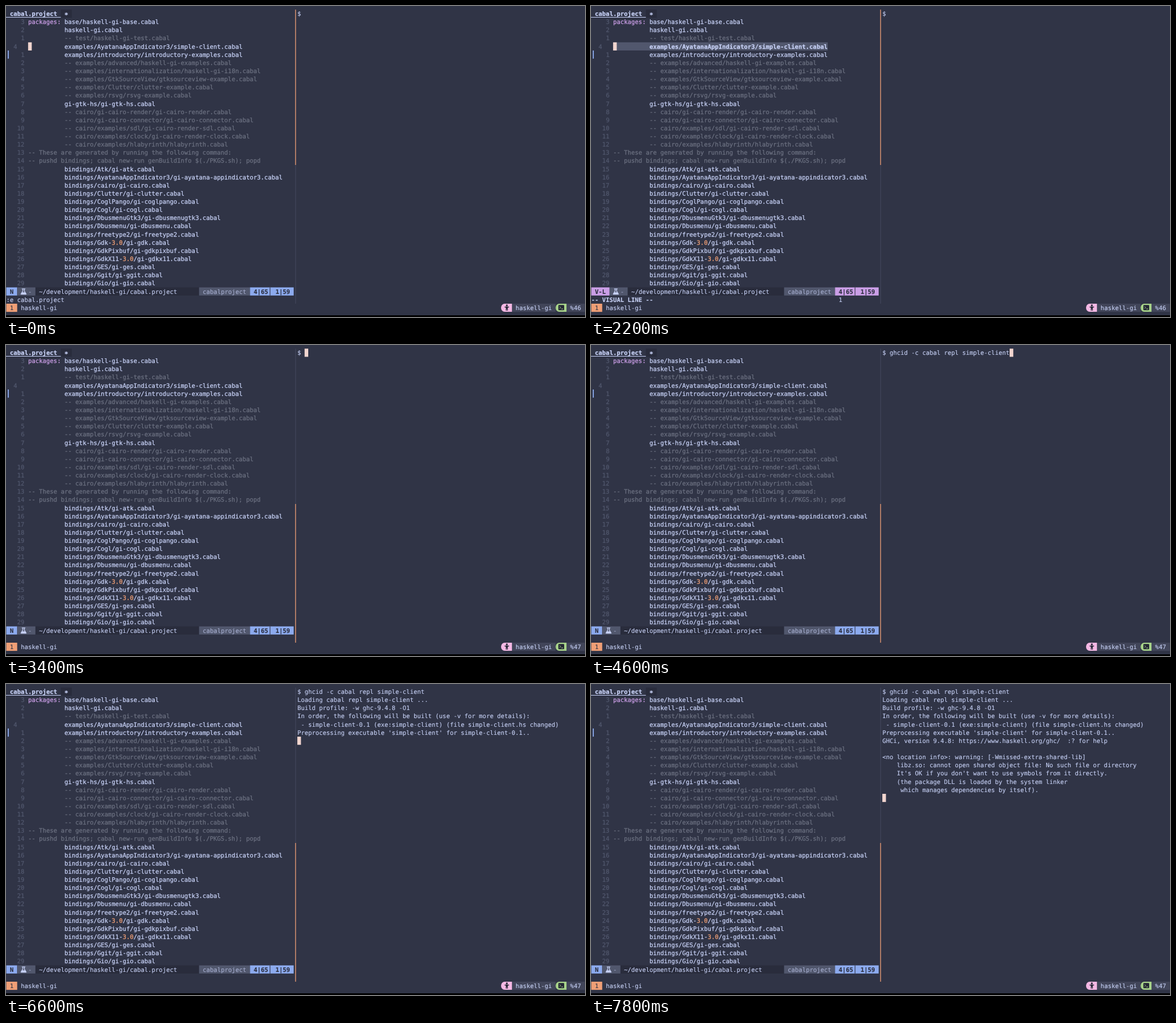
These frames come from a looping animation (1000x538 px, 8000 ms). An HTML page:

```html
<!DOCTYPE html>
<html lang="en">
<head>
<meta charset="utf-8">
<title>Terminal session</title>
<style>
  html, body { margin: 0; width: 100%; height: 100%; overflow: hidden; background: #303446; }
  svg { display: block; width: 100vw; height: 100vh; }
  text {
    font: 10.437px "DejaVu Sans Mono", "Noto Sans Mono", monospace;
    white-space: pre;
    text-rendering: geometricPrecision;
  }
  text, tspan { fill: currentColor; stroke: currentColor; stroke-width: .12; }
  .files text, .files tspan { stroke-width: .28; }
  .bold { font-weight: bold; }
</style>
</head>
<body>
<svg id="stage" viewBox="0 0 1000 538"></svg>
<script>
const LOOP = 8000, CW = 6.283, RH = 14.13, LEFT = .5, TOP = 6.3, RIGHT = 80;
const C = {
  text: '#c6d0f5', sub: '#a5adce', dim: '#6b7080', num: '#51576d', bar: '#51576d',
  mantle: '#292c3c', surface: '#414559', base: '#303446', crust: '#232634', black: '#000',
  blue: '#8caaee', mauve: '#ca9ee6', peach: '#ef9f76',
  cursor: '#f2d5cf', pink: '#f4b8e4', green: '#a6d189'
};

const FILES = `packages: base/haskell-gi-base.cabal
haskell-gi.cabal
-- test/haskell-gi-test.cabal
examples/AyatanaAppIndicator3/simple-client.cabal
examples/introductory/introductory-examples.cabal
-- examples/advanced/haskell-gi-examples.cabal
-- examples/internationalization/haskell-gi-i18n.cabal
-- examples/GtkSourceView/gtksourceview-example.cabal
-- examples/Clutter/clutter-example.cabal
-- examples/rsvg/rsvg-example.cabal
gi-gtk-hs/gi-gtk-hs.cabal
-- cairo/gi-cairo-render/gi-cairo-render.cabal
-- cairo/gi-cairo-connector/gi-cairo-connector.cabal
-- cairo/examples/sdl/gi-cairo-render-sdl.cabal
-- cairo/examples/clock/gi-cairo-render-clock.cabal
-- cairo/examples/hlabyrinth/hlabyrinth.cabal
-- These are generated by running the following command:
-- pushd bindings; cabal new-run genBuildInfo $(./PKGS.sh); popd
bindings/Atk/gi-atk.cabal
bindings/AyatanaAppIndicator3/gi-ayatana-appindicator3.cabal
bindings/cairo/gi-cairo.cabal
bindings/Clutter/gi-clutter.cabal
bindings/CoglPango/gi-coglpango.cabal
bindings/Cogl/gi-cogl.cabal
bindings/DbusmenuGtk3/gi-dbusmenugtk3.cabal
bindings/Dbusmenu/gi-dbusmenu.cabal
bindings/freetype2/gi-freetype2.cabal
bindings/Gdk-3.0/gi-gdk.cabal
bindings/GdkPixbuf/gi-gdkpixbuf.cabal
bindings/GdkX11-3.0/gi-gdkx11.cabal
bindings/GES/gi-ges.cabal
bindings/Ggit/gi-ggit.cabal
bindings/Gio/gi-gio.cabal`.split('\n');

const OUTPUT = `$ ghcid -c cabal repl simple-client
Loading cabal repl simple-client ...
Build profile: -w ghc-9.4.8 -O1
In order, the following will be built (use -v for more details):
 - simple-client-0.1 (exe:simple-client) (file simple-client.hs changed)
Preprocessing executable 'simple-client' for simple-client-0.1..
GHCi, version 9.4.8: https://www.haskell.org/ghc/  :? for help

<no location info>: warning: [-Wmissed-extra-shared-lib]
    libz.so: cannot open shared object file: No such file or directory
    It's OK if you don't want to use symbols from it directly.
    (the package DLL is loaded by the system linker
     which manages dependencies by itself).`.split('\n');

// [start ms, finished output lines]
const PRINTED = [[6000, 2], [6400, 5], [6600, 6], [6800, 7], [7800, 13]];

const X = col => LEFT + col * CW;
const Y = row => TOP + row * RH;
const escape = s => s.replace(/</g, '&lt;');
const rect = (x, y, w, h, fill) =>
  `<rect x="${x}" y="${y}" width="${w}" height="${h}" fill="${fill}"/>`;
const cells = (col, row, n, fill) => rect(X(col), Y(row), n * CW, RH, fill);
const put = (col, row, s, color = C.text, bold = false) =>
  `<text x="${X(col)}" y="${Y(row) + 10.8}" color="${color}"${bold ? ' class="bold"' : ''}>${s}</text>`;
const span = (s, color) => `<tspan color="${color}">${s}</tspan>`;
const path = (d, fill) => `<path d="${d}" fill="${fill}" fill-rule="evenodd"/>`;

function editor(visual) {
  let out = cells(15, 0, 3, C.mantle) + put(1, 0, 'cabal.project', C.text, true) +
    put(16, .15, '*', C.text, true) + rect(0, 19, X(15), 1, C.text) +
    rect(3, Y(5), 1.8, RH, C.blue);
  FILES.forEach((line, i) => {
    const row = i + 1, here = row === 4;
    const col = /^(packages|-- (These|pushd))/.test(line) ? 6 : 16;
    const num = String(here ? 4 : Math.abs(row - 4));
    out += put(here ? 2 : 5 - num.length, row, num, C.num);
    if (here && visual) out += cells(6, row, 59, C.bar);
    const code = line.replace('packages:', s => span(s, C.mauve)).replace('3.0', s => span(s, C.peach));
    out += put(col, row, code, line.startsWith('--') ? C.dim : C.text, here && visual);
  });
  return `<g class="files">${out}</g>`;
}

function statusLine(visual) {
  const row = 34, accent = visual ? C.mauve : C.blue, mode = visual ? 'V-L' : 'N';
  const c = mode.length + 2, x = X(c) + 6, y = Y(row) + 2;
  return cells(0, row, 79, C.mantle) + cells(0, row, c, accent) + cells(c, row, 5, C.bar) +
    put(1, row, mode, C.mantle, true) +
    path(`M${x + 2} ${y}h6v1.3h-1v3l3 5q.4 1.2-1 1.2h-8q-1.4 0-1-1.2l3-5v-3h-1z` +
      `M${x + 4.3} ${y + 1.3}v3.3l-1.2 2h3.8l-1.2-2v-3.3z`, C.text) +
    put(c + 3, row, '-', C.sub) + put(c + 6, row, '~/development/haskell-gi/cabal.project') +
    cells(53, row, 14, C.bar) + put(54, row, 'cabalproject', C.sub) +
    cells(67, row, 12, accent) + rect(X(72.5) - .5, Y(row), 1, RH, C.mantle) +
    put(68, row, '4|65', C.mantle, true) + put(74, row, '1|59', C.mantle, true);
}

// Badge three cells wide with a rounded left end
const pill = (col, fill) =>
  path(`M${X(col + 3)} ${Y(36)}v${RH}H${X(col + 1)}a${CW} ${RH / 2} 0 0 1 0 ${-RH}z`, fill);

function bottomBar(percent) {
  const row = 36;
  return cells(0, row, 3, C.peach) + put(1, row, '1', C.base) + put(4, row, 'haskell-gi') +
    cells(139, row, 12, C.surface) + cells(154, row, 5, C.surface) +
    pill(136, C.pink) + pill(151, C.green) +
    `<circle cx="865" cy="518" r="1.7" fill="${C.crust}"/>` +
    path('M861.2 520.1h7.6v1.3h-2.1v5.6h-1.3v-2.8h-.8v2.8h-1.3v-5.6h-2.1z', C.crust) +
    `<rect x="954" y="517.2" width="10" height="9" rx="1.2" fill="${C.crust}"/>` +
    `<path d="M956 519.7l2 2-2 2M959 524h3" fill="none" stroke="${C.green}"/>` +
    put(140, row, 'haskell-gi') + put(155, row, '%' + percent);
}

function terminal(t, active) {
  const step = PRINTED.filter(p => t >= p[0]).pop();
  const lines = step ? OUTPUT.slice(0, step[1]) : [t >= 4200 ? OUTPUT[0] : '$ '];
  const out = lines.map((s, i) => put(RIGHT, i, escape(s))).join('');
  if (!active) return out;
  return out + (step ? cells(RIGHT, lines.length, 1, C.cursor)
                     : cells(RIGHT + lines[0].length, 0, 1, C.cursor));
}

function border(active) {
  const x = X(79.5) - .5, mid = 275;
  const top = active ? C.surface : C.peach, low = active ? C.peach : C.surface;
  return rect(x, TOP, 1.3, mid - TOP, top) + rect(x, mid, 1.3, Y(36) - mid, low);
}

function scene(t) {
  const visual = t >= 1600 && t < 2800, active = t >= 3400;
  let out = rect(0, 0, 1000, 538, C.base) + rect(0, 535, 1000, 3, C.black) +
    editor(visual) + statusLine(visual) + border(active) +
    terminal(t, active) + bottomBar(active ? 47 : 46);
  if (t < 1600) out += put(0, 35, ':e cabal.project');
  if (visual) out += put(0, 35, '-- VISUAL LINE --', C.text, true) + put(68, 35, '1');
  if (!active) out += cells(6, 4, 1, C.cursor);
  return out;
}

const stage = document.getElementById('stage');
let shown = '';
function frame(now) {
  const next = scene(now % LOOP);
  if (next !== shown) stage.innerHTML = shown = next;
  requestAnimationFrame(frame);
}
frame(0);
</script>
</body>
</html>
```
